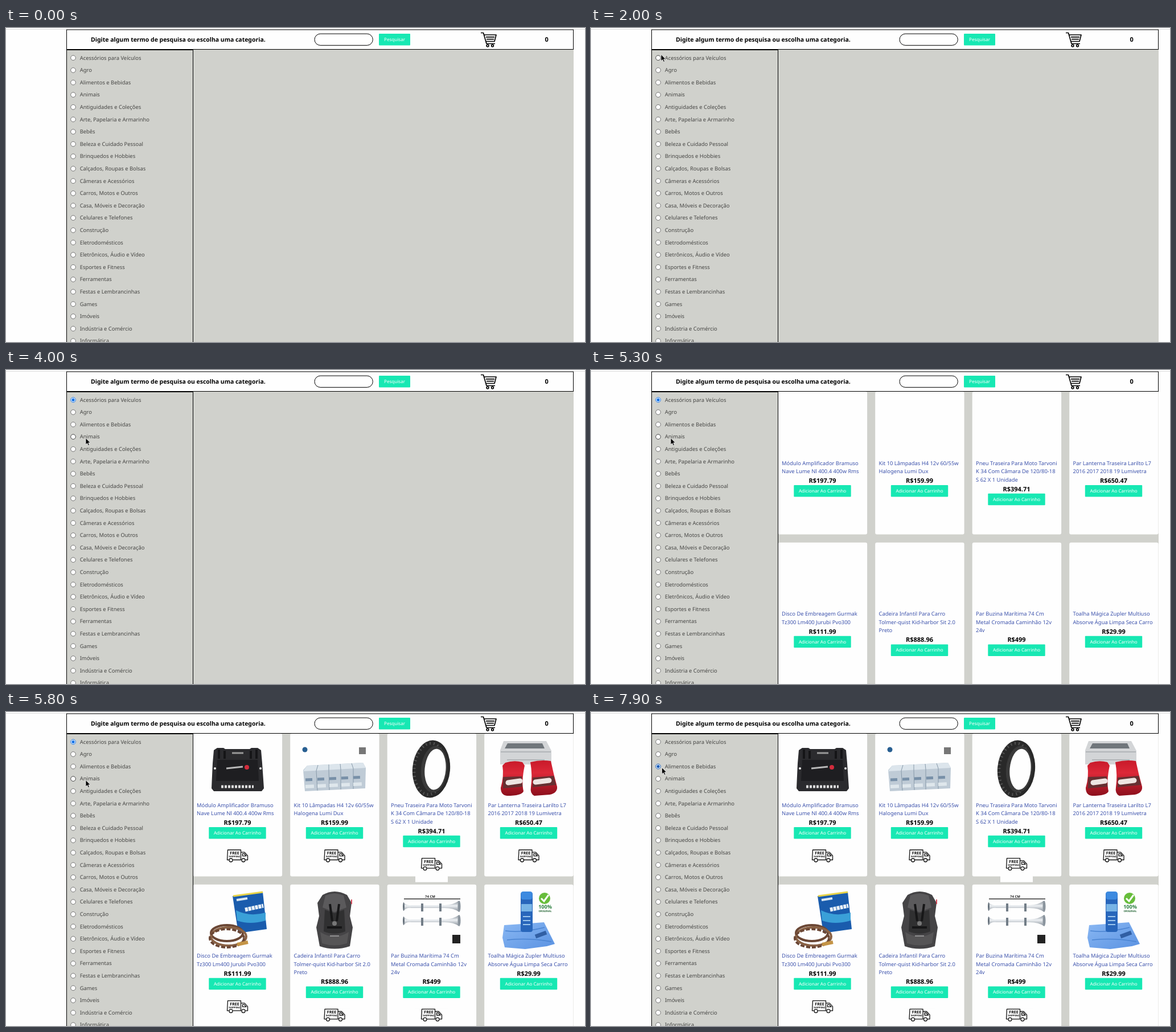
An HTML page that plays this animation: 1017x551 px, repeating every 8000 ms.

```html
<!DOCTYPE html>
<html lang="pt">
<head>
<meta charset="utf-8">
<style>
html, body { margin: 0; width: 100%; height: 100%; overflow: hidden; background: #fefefe; }
svg { display: block; }
text { font: 9.4px "Noto Sans", "Open Sans", sans-serif; fill: #474745; text-rendering: geometricPrecision; }
.mid { text-anchor: middle; }
.head { font-size: 10.46px; font-weight: 700; fill: #000; }
.price { font-size: 10.95px; font-weight: 700; fill: #000; }
.btn { font-size: 8.05px; fill: #fff; }
.name { fill: #3c52ac; }
.free { font-size: 7px; font-weight: 700; fill: #111; }
.ship { font-size: 4.1px; font-weight: 700; fill: #111; }
</style>
</head>
<body>
<svg width="1017" height="551" viewBox="0 0 1017 551">
  <defs>
    <clipPath id="page"><rect x="106" y="38" width="891" height="513"/></clipPath>
    <linearGradient id="metal" x2="0" y2="1">
      <stop stop-color="#7d8791"/><stop offset=".45" stop-color="#eef1f4"/><stop offset="1" stop-color="#7d8791"/>
    </linearGradient>
    <linearGradient id="lamp" x2="0" y2="1">
      <stop stop-color="#c81a2a"/><stop offset=".35" stop-color="#dc2838"/><stop offset="1" stop-color="#8c0f1c"/>
    </linearGradient>
    <linearGradient id="cloth" x2="1" y2="1">
      <stop stop-color="#8ab8f3"/><stop offset="1" stop-color="#5a92e2"/>
    </linearGradient>
  </defs>
  <path d="M0 2.5H1017" stroke="#dcdcdc"/>
  <rect x="106" y="38" width="891" height="513" fill="#d0d1cc"/>
  <g clip-path="url(#page)">
    <g id="cards"></g>
    <g id="trucks"></g>
    <g id="photos">
      <!-- amplifier -->
      <path d="M365 67L371 63H382L385 65H428L431 63H442L448 67 450 90 453 134 449 139H365L361 134 363 90Z" fill="#2b2b2e"/>
      <path d="M371 84H442L444 121H369Z" fill="#1e1e21"/>
      <path d="M374 66V82M384 68V82M430 68V82M440 66V82" stroke="#151517" stroke-width="4"/>
      <path d="M397 72H417" stroke="#999" stroke-width="3"/>
      <path d="M387 99L416 96" stroke="#b8b8b8" stroke-width="3"/>
      <circle cx="423" cy="97" r="4" fill="#d22c3c"/>
      <path d="M378 131H435" stroke="#ddd" stroke-width="5" stroke-dasharray="4 2"/>
      <g fill="#eee"><circle cx="367" cy="99" r="2"/><circle cx="447" cy="99" r="2"/></g>
      <!-- lamp boxes -->
      <circle cx="525" cy="66" r="4.5" fill="#285f91"/>
      <rect x="620" y="62" width="12" height="12" fill="#777"/>
      <path d="M529 94L627 89 632 98 631 134 525 139 522 102Z" fill="#bfcbd6"/>
      <path d="M529 94L627 89 632 98 522 104Z" fill="#dce5ec"/>
      <path d="M545 103L547 138M567 102L568 137M588 101V136M610 99V135M548 93L545 103M567 92V102M587 91L588 101M607 90L610 99" stroke="#8799a9" fill="none"/>
      <path d="M526 119L630 114" stroke="#7890a8" stroke-width="5" stroke-dasharray="12 9"/>
      <path d="M526 131L630 126" stroke="#dfe7ec" stroke-width="6" stroke-dasharray="15 6"/>
      <!-- tyre -->
      <g transform="rotate(5 747 100)">
        <ellipse cx="747" cy="100" rx="33" ry="50.5" fill="#292929"/>
        <ellipse cx="744" cy="100" rx="27" ry="45" fill="none" stroke="#505050" stroke-width="5" stroke-dasharray="2 5"/>
        <ellipse cx="752" cy="100" rx="23" ry="41" fill="#3a3a3a"/>
        <ellipse cx="754" cy="100" rx="18.5" ry="36" fill="#fefefe"/>
      </g>
      <!-- tail lights -->
      <path d="M874 51H949L958 68V92H868V67Z" fill="#d3d5d7"/>
      <path d="M881 55H942L946 64H876Z" fill="#70767b"/>
      <path d="M869 70H957M880 84H946" stroke="#b1b5b8" stroke-width="2"/>
      <path d="M877 89Q892 84 907 88L911 94Q905 122 909 139 906 147 880 147 869 146 869 133 875 112 872 94Z" fill="url(#lamp)"/>
      <path d="M921 88Q940 83 957 86 962 110 968 131 969 142 955 145L928 147Q920 143 922 132 925 111 921 88Z" fill="url(#lamp)"/>
      <path d="M873 114L906 113 907 131 873 134ZM925 115L962 112 966 128 925 132Z" fill="#663032"/>
      <path d="M882 124L903 121M930 123L954 120" stroke="#eee5e2" stroke-width="9" stroke-linecap="round"/>
      <!-- clutch discs -->
      <path d="M398 323L451 316 458 381 408 388Z" fill="#1a5cad"/>
      <path d="M399 323L451 316" stroke="#e7d348" stroke-width="3"/>
      <path d="M404 348Q428 360 456 352V366Q428 374 406 366Z" fill="#3aa0d8"/>
      <path d="M405 330L424 327" stroke="#d9e7f3" stroke-width="4"/>
      <path d="M420 347L452 340" stroke="#e9f1f8" stroke-width="7" stroke-dasharray="5 1"/>
      <g fill="none" stroke="#6b4735" stroke-width="4">
        <ellipse cx="388" cy="388" rx="28" ry="14"/>
        <ellipse cx="391" cy="394" rx="31" ry="16" stroke="#8b6346"/>
        <ellipse cx="388" cy="397" rx="30" ry="16" stroke-dasharray="7 3"/>
      </g>
      <path d="M406 408L425 404" stroke="#c49446" stroke-width="6"/>
      <!-- child seat -->
      <path d="M556 321Q577 309 599 321L607 335 604 358 609 378 604 411Q577 420 551 411L545 378 550 358 547 335Z" fill="#454446"/>
      <path d="M561 322Q577 315 593 322L598 343 577 351 556 343Z" fill="#5b5a5c"/>
      <path d="M560 347L577 353 594 347 596 385Q577 393 558 385Z" fill="#303031"/>
      <path d="M569 337L573 367M585 337L581 367M564 378H590" stroke="#171718" stroke-width="4"/>
      <path d="M552 386Q577 402 602 386L599 406Q577 413 555 406Z" fill="#565556"/>
      <path d="M569 393H585" stroke="#aaa" stroke-width="1.5"/>
      <circle cx="577" cy="371" r="4" fill="#777"/>
      <path d="M607 329V337" stroke="#d44a5a" stroke-width="2"/>
      <!-- horns -->
      <path d="M699 328H798" stroke="#333" stroke-width="1.5"/>
      <text x="745" y="326" class="mid" style="font-size:6px;font-weight:600;fill:#222">74 CM</text>
      <g id="horn">
        <path d="M698 334Q703 340 712 339H770Q787 338 796 331V351Q787 344 770 344H712Q703 343 698 349Z" fill="url(#metal)"/>
        <path d="M731 336V350M763 336V350" stroke="#727d87" stroke-width="4"/>
        <ellipse cx="796" cy="341" rx="2.5" ry="10" fill="#8a949d"/>
        <ellipse cx="698.5" cy="341.5" rx="1.5" ry="7.5" fill="#68737d"/>
      </g>
      <use href="#horn" y="25"/>
      <rect x="784" y="391" width="14" height="15" fill="#222"/>
      <!-- towel -->
      <path d="M875 374L905 372 945 369 955 389 964 407 950 411 912 416 876 413 872 396Z" fill="url(#cloth)"/>
      <path d="M877 384Q906 388 946 378M880 400Q918 396 958 403" stroke="#4a84d2" stroke-width="1.5" fill="none"/>
      <path d="M930 394L949 387" stroke="#315fa4" stroke-width="7"/>
      <rect x="904" y="316" width="21" height="70" rx="4" fill="#2866bb"/>
      <rect x="904.5" y="315" width="20" height="14" rx="4" fill="#3d8ae0"/>
      <path d="M905 337H924V350H905Z" fill="#78b4e6"/>
      <path d="M908 359H921M908 366H921M908 373H921" stroke="#9cc6ec" stroke-width="2"/>
      <circle cx="946" cy="327" r="10" fill="#67bd3b"/>
      <path d="M940 327L945 332 953 321" fill="none" stroke="#fff" stroke-width="3"/>
      <text x="947" y="345" class="mid" style="font-size:9px;font-weight:700;fill:#2c8040">100%</text>
      <text x="947" y="351" class="mid" style="font-size:4.6px;font-weight:600;fill:#2c6a3c">ORIGINAL</text>
    </g>
  </g>
  <rect x="106.5" y="38.5" width="222" height="530" fill="#d0d1cc" stroke="#000"/>
  <g id="menu"></g>
  <rect x="106.5" y="3" width="890" height="34.5" fill="#fefefe" stroke="#000"/>
  <text x="149" y="24" class="head">Digite algum termo de pesquisa ou escolha uma categoria.</text>
  <rect x="542" y="10.2" width="102.3" height="20.2" rx="10.1" fill="#fff" stroke="#000"/>
  <rect x="655" y="10" width="55" height="20.5" rx="1" fill="#17e8b3"/>
  <text x="682.5" y="23" class="btn mid">Pesquisar</text>
  <g fill="none" stroke="#000" stroke-width="1.7" stroke-linejoin="round">
    <path d="M834 8.5H838.5L844 27.5H859M840 12H861L858 23.5H843M843 15.8H858M844 19.6H857"/>
    <circle cx="846" cy="31" r="1.9"/><circle cx="854.5" cy="31" r="1.9"/>
  </g>
  <text x="949.7" y="24" class="price mid">0</text>
  <path id="cursor" d="M0 0V11.5L2.7 9 4.5 13 6.4 12.2 4.7 8.3H8.2Z" fill="#000" stroke="#fff" stroke-width=".7"/>
</svg>
<script>
const $ = id => document.getElementById(id);
const rowY = i => 52.4 + 21.6 * i;

const categories = `Acessórios para Veículos|Agro|Alimentos e Bebidas|Animais|Antiguidades e Coleções|Arte, Papelaria e Armarinho|Bebês|Beleza e Cuidado Pessoal|Brinquedos e Hobbies|Calçados, Roupas e Bolsas|Câmeras e Acessórios|Carros, Motos e Outros|Casa, Móveis e Decoração|Celulares e Telefones|Construção|Eletrodomésticos|Eletrônicos, Áudio e Vídeo|Esportes e Fitness|Ferramentas|Festas e Lembrancinhas|Games|Imóveis|Indústria e Comércio|Informática`.split('|');

const products = [
  ['197.79', 'Módulo Amplificador Bramuso', 'Nave Lume Nl 400.4 400w Rms'],
  ['159.99', 'Kit 10 Lâmpadas H4 12v 60/55w', 'Halogena Lumi Dux'],
  ['394.71', 'Pneu Traseira Para Moto Tarvoni', 'K 34 Com Câmara De 120/80-18', 'S 62 X 1 Unidade'],
  ['650.47', 'Par Lanterna Traseira Larilto L7', '2016 2017 2018 19 Lumivetra'],
  ['111.99', 'Disco De Embreagem Gurmak', 'Tz300 Lm400 Jurubi Pvo300'],
  ['888.96', 'Cadeira Infantil Para Carro', 'Tolmer-quist Kid-harbor Sit 2.0', 'Preto'],
  ['499', 'Par Buzina Marítima 74 Cm', 'Metal Cromada Caminhão 12v', '24v'],
  ['29.99', 'Toalha Mágica Zupler Multiuso', 'Absorve Água Limpa Seca Carro']
];

$('menu').innerHTML = categories.map((name, i) =>
  `<circle cx="118" cy="${rowY(i)}" r="4.3"/><circle cx="118" cy="${rowY(i)}" r="2.6"/>
   <text x="129.7" y="${rowY(i) + 3.2}">${name}</text>`).join('');
const dots = $('menu').querySelectorAll('circle');

const truck = (x, y) => `<g transform="translate(${x} ${y})">
  <rect x="-28.5" width="57" height="42.8" fill="#fefefe"/>
  <g fill="none" stroke="#111" stroke-width="1.3" stroke-linejoin="round">
    <path d="M-15 18.3H-18L-17 .8H6V18.3H-8M6 5H12.5L18 11V18.3H14M9 7.5H12L15.5 11.5H9Z"/>
    <circle cx="-11.5" cy="18.8" r="3"/><circle cx="10.5" cy="18.8" r="3"/>
  </g>
  <text x="-5" y="8.8" class="free mid">FREE</text>
  <text x="-5.2" y="13.8" class="ship mid">SHIPPING</text></g>`;

products.forEach(([price, ...lines], i) => {
  const x = 328.7 + 170.5 * (i % 4), y = 38 + 264.7 * (i >> 2);
  const mid = x + 77.8, end = y + 128.5 + 14.6 * lines.length;
  $('cards').innerHTML += `<rect x="${x}" y="${y}" width="156.4" height="250.6" rx="3" fill="#fefefe"/>` +
    lines.map((s, n) => `<text x="${x + 6.4}" y="${y + 128.5 + 14.6 * n}" class="name">${s}</text>`).join('') +
    `<text x="${mid}" y="${end + 2.2}" class="price mid">R$${price}</text>
     <rect x="${mid - 50.2}" y="${end + 6.4}" width="100.4" height="20.5" rx="1" fill="#17e8b3"/>
     <text x="${mid}" y="${end + 19.3}" class="btn mid">Adicionar Ao Carrinho</text>`;
  if (i < 7) $('trucks').innerHTML += truck(mid, end + 45.5);
});

// time, x, y of the pointer tip
const path = [
  [800, 771, 455], [1000, 480, 270], [1300, 200, 90], [1600, 137, 57], [1900, 137, 57],
  [2000, 123, 46.5], [2100, 121.3, 50], [3200, 121.3, 50], [3800, 132, 103.5], [3900, 132, 103.5],
  [4000, 140, 119.5], [6500, 140, 119.5], [6800, 125, 96], [7100, 125, 96], [7200, 124.5, 97.5], [8000, 124.5, 97.5]
];

function pointer(t) {
  const k = Math.max(1, path.findIndex(p => p[0] > t));
  const [a, b] = [path[k - 1], path[k]];
  const f = Math.max(0, (t - a[0]) / (b[0] - a[0]));
  return [a[1] + (b[1] - a[1]) * f, a[2] + (b[2] - a[2]) * f];
}

function paint(dot, value) {
  for (const [k, v] of Object.entries(value)) dot.setAttribute(k, v);
}

function draw(now) {
  const t = Math.floor(now % 8000 / 100) * 100;
  const [x, y] = pointer(t);
  const shown = t >= 800;
  const checked = t >= 7900 ? 2 : t >= 3200 ? 0 : -1;
  const pressed = t === 2400 || t === 7200;
  categories.forEach((_, i) => {
    const hover = shown && x < 250 && Math.abs(y - rowY(i)) < 8;
    const on = i === checked;
    const color = on ? (hover ? '#135bb9' : '#1674e8') : hover ? (pressed ? '#8d8d8d' : '#454545') : '#747474';
    paint(dots[2 * i], { fill: '#fefefe', stroke: color, 'stroke-width': 1 });
    paint(dots[2 * i + 1], { fill: on ? color : 'none' });
  });
  $('cursor').setAttribute('transform', `translate(${x} ${y})`);
  const show = (id, on) => $(id).style.display = on ? '' : 'none';
  show('cursor', shown);
  show('cards', t >= 5300);
  show('trucks', t >= 5400);
  show('photos', t >= 5800);
}

const start = performance.now();
(function tick() {
  draw(performance.now() - start);
  requestAnimationFrame(tick);
})();
</script>
</body>
</html>
```
